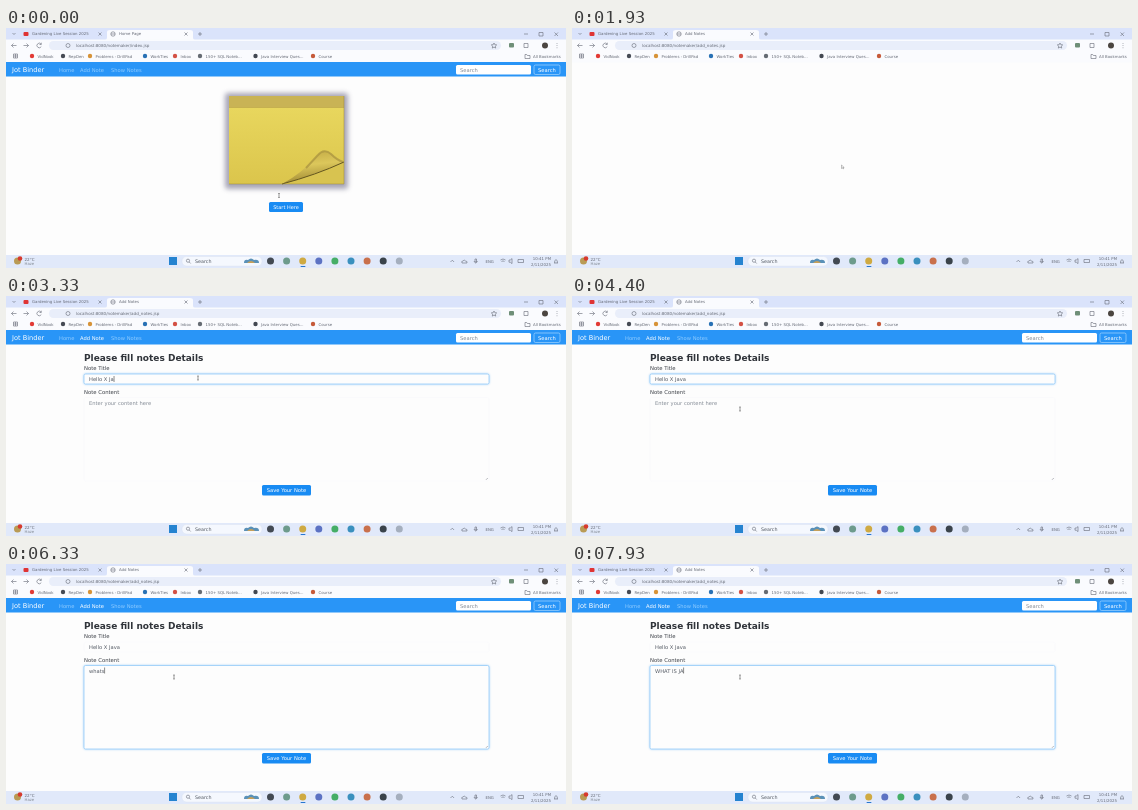
Recreate the animation shown at these times as an HTML page. Size 560x240 px, loop 8 s.

```html
<!DOCTYPE html>
<html lang="en">
<head>
<meta charset="utf-8">
<title>Notes demo</title>
<style>
html, body { margin: 0; width: 100%; height: 100%; overflow: hidden; background: #fdfdfd; }
svg { display: block; width: 560px; height: 240px; }
text { font: 5.2px "DejaVu Sans", sans-serif; white-space: pre; fill: #555b65; }
.small { font-size: 4.1px; fill: #656a76; }
.tiny { font-size: 3.9px; fill: #656a76; }
.brand { font-size: 6.6px; fill: #fff; }
.heading { font-size: 9px; font-weight: bold; fill: #30343a; }
.label { font-size: 5.3px; fill: #3b3f46; }
.hint { fill: #858c96; }
.white { fill: #fff; }
.faded { fill: #8fcbff; }
.line { fill: none; stroke: #666b76; stroke-width: .6; }
.box { fill: #fdfdfd; stroke: #f6f7fa; stroke-width: .5; }
.focus { stroke: #95cbf8; stroke-width: .8; filter: drop-shadow(0 0 .8px #a9d5fa); }
</style>
</head>
<body>
<svg viewBox="0 0 560 240" xmlns="http://www.w3.org/2000/svg">
  <defs>
    <linearGradient id="paper" x1="0" y1="0" x2="0" y2="1">
      <stop offset="0" stop-color="#ead960"/><stop offset="1" stop-color="#dbc54c"/>
    </linearGradient>
    <linearGradient id="flap" x1=".4" y1="0" x2=".6" y2="1">
      <stop offset="0" stop-color="#c5ad47"/><stop offset=".4" stop-color="#dcc75b"/><stop offset="1" stop-color="#98822f"/>
    </linearGradient>
    <filter id="blur" x="-20%" y="-20%" width="140%" height="140%"><feGaussianBlur stdDeviation="2.500"/></filter>
    <filter id="soft" x="-20%" y="-20%" width="140%" height="140%"><feGaussianBlur stdDeviation=".7"/></filter>
  </defs>
  <rect width="560" height="240" fill="#fdfdfd"/>

  <!-- browser frame -->
  <rect width="560" height="14" fill="#dae3fb"/>
  <path d="M99 12q2 0 2-3V4q0-2 3-2h80q3 0 3 2v5q0 3 2 3z" fill="#fafbfe"/>
  <rect y="11.5" width="560" height="23" fill="#fafbfe"/>
  <rect x="43" y="13" width="452" height="9" rx="4.500" fill="#e9eefa"/>
  <path class="line" d="M6.500 5l1.500 1.500 1.500-1.500M92.500 4.500l3 3m0-3l-3 3M178.500 4.500l3 3m0-3l-3 3M192 6h4m-2-2v4M518 6h4M533 4.500h4v3.500h-4zM548.500 4.500l3.500 3.500m0-3.500l-3.500 3.500"/>
  <path class="line" d="M10.500 17.500h-5m2-2l-2 2 2 2M17.500 17.500h5m-2-2l2 2-2 2M35 16a2.300 2.300 0 1 0 .3 2.500M35.300 14.700v1.800h-1.800M551 15v.8m0 1.400v.8m0 1.400v.8"/>
  <path class="line" d="M488 15l.8 1.700 1.900.2-1.400 1.300.4 1.900-1.700-1-1.700 1 .4-1.900-1.400-1.300 1.900-.2z"/>
  <circle class="line" cx="107" cy="6" r="2.200"/><path class="line" d="M105 6h4"/>
  <circle class="line" cx="62" cy="17.500" r="2"/>
  <rect x="503" y="15" width="5" height="4.500" rx="1" fill="#6f8f78"/>
  <path class="line" d="M518 15.500h4v4h-4z"/>
  <circle cx="539" cy="17.500" r="3" fill="#4b4540"/>
  <rect x="17.500" y="4" width="5" height="4" rx="1" fill="#df3434"/>
  <text class="tiny" x="26" y="7.300">Gardening Live Session 2025</text>
  <text class="tiny" id="tab" x="113" y="7.300"></text>
  <text class="small" id="url" x="70" y="19"></text>
  <path class="line" d="M7.500 26h4v4h-4zM9.500 26v4M7.500 28h4M519 26.500h1.700l.7 1h2.600v3h-5z"/>
  <text class="tiny" x="527" y="29.500">All Bookmarks</text>
  <g id="bookmarks"></g>

  <!-- web page -->
  <g id="navbar">
    <rect y="34" width="560" height="14.500" fill="#2995f7"/>
    <text class="brand" x="6" y="43.900">Jot Binder</text>
    <text class="faded" x="53" y="43.600">Home</text>
    <text id="addLink" x="74" y="43.600">Add Note</text>
    <text class="faded" x="105" y="43.600">Show Notes</text>
    <rect x="450" y="37" width="75" height="9.500" rx="1.500" fill="#fff"/>
    <text class="hint" x="454" y="43.600">Search</text>
    <rect x="528" y="37" width="26" height="9.500" rx="1.500" fill="none" stroke="#b9dfff" stroke-width=".6"/>
    <text class="white" x="532" y="43.600">Search</text>
  </g>
  <g id="home">
    <rect x="219" y="65" width="123" height="96" rx="3" fill="#73718c" opacity=".62" filter="url(#blur)"/>
    <rect x="223" y="68" width="115" height="88" fill="url(#paper)"/>
    <rect x="223" y="68" width="115" height="11" fill="#c9b355"/>
    <path d="M223 79.500h115" stroke="#b8a149" stroke-width=".7"/>
    <path d="M276 156L338 134V156z" fill="#d8c350"/>
    <path d="M276 156Q295 146 312 127Q318 120 325 126Q331 132 338 134Q306 148 276 156z" fill="url(#flap)"/>
    <path d="M300 140L312 127Q318 120 325 126Q331 132 337 134" fill="none" stroke="#aa9440" stroke-width="2" opacity=".75" filter="url(#soft)"/>
    <path d="M276 156Q310 147 338 134" fill="none" stroke="#63551f" stroke-width="1"/>
    <path d="M223 156h115V68" fill="none" stroke="#9a8539" stroke-width=".5"/>
    <rect x="263" y="174" width="34" height="10" rx="1.500" fill="#188bf3"/>
    <text class="white" x="280" y="180.900" text-anchor="middle" style="font-size:5px">Start Here</text>
  </g>
  <g id="form">
    <text class="heading" x="78" y="65">Please fill notes Details</text>
    <text class="label" x="78" y="74">Note Title</text>
    <rect id="titleBox" class="box" x="78" y="78" width="405" height="10" rx="1.500"/>
    <text id="title" x="83" y="85"></text>
    <text class="label" x="78" y="98">Note Content</text>
    <rect id="contentBox" class="box" x="78" y="101.500" width="405" height="83.500" rx="1.500"/>
    <text id="content" x="83" y="108.500"></text>
    <path class="line" d="M480 183.800l1.800-1.800" style="stroke-width:.5"/>
    <rect x="256" y="189" width="49" height="10.500" rx="1.500" fill="#188bf3"/>
    <text class="white" x="280.500" y="196.200" text-anchor="middle">Save Your Note</text>
    <rect id="caret" width=".6" height="6" fill="#444"/>
  </g>

  <!-- taskbar -->
  <rect y="227" width="560" height="13" fill="#e1e9fa"/>
  <circle cx="11.500" cy="233" r="3.500" fill="#b99b55"/>
  <circle cx="14" cy="230.500" r="2.300" fill="#d63a2e"/>
  <text class="small" x="18.500" y="232.500">22°C</text>
  <text class="tiny hint" x="18.500" y="237.300">Haze</text>
  <rect x="176" y="228.500" width="80" height="9.500" rx="4.500" fill="#f5f8fe" stroke="#d9e1ef" stroke-width=".4"/>
  <circle class="line" cx="182" cy="232.700" r="1.600"/><path class="line" d="M183.200 234l1.500 1.500"/>
  <text x="189" y="235" style="font-size:4.800px">Search</text>
  <path d="M238 235q0-4 4-3q3-3 6 0q5-1 5 3z" fill="#5a91b8"/>
  <path d="M241 235q4-4 8 0z" fill="#c6a05a"/>
  <g id="apps"></g>
  <rect x="294.500" y="238" width="5" height=".9" rx=".4" fill="#2877cf"/>
  <path class="line" d="M444.500 234l1.800-1.800 1.800 1.800M456 235q-1-2 1-2q1-2 2.500 0q2 0 1.500 2zM469 231h1.500v3H469zM468 233q1.700 4 3.500 0M494.500 232q2.500-2 5 0M495.500 233.500q1.500-1.200 3 0M503 232h1.300l1.700-1.400v5l-1.700-1.400H503zM512 231.500h5.500v3H512zM548 235h4M548.700 235v-2q1.300-3 2.600 0v2"/>
  <text class="tiny" x="479.500" y="234.700">ENG</text>
  <text class="tiny" x="545" y="232.200" text-anchor="end">10:41 PM</text>
  <text class="tiny" x="545" y="237.500" text-anchor="end">2/11/2025</text>

  <g id="pointer">
    <path id="arrow" d="M0 0v3.500l.9-.8.6 1.300.6-.3-.6-1.200h1.200z" fill="#fff" stroke="#666" stroke-width=".4"/>
    <path id="beam" class="line" d="M-.8-2h1.600M0-2v4M-.8 2h1.600" style="stroke:#555;stroke-width:.6"/>
  </g>
</svg>
<script>
const LOOP = 8000;
const $ = id => document.getElementById(id);
const NS = "http://www.w3.org/2000/svg";

function add(parent, tag, attrs, label = "") {
  const node = document.createElementNS(NS, tag);
  for (const key in attrs) node.setAttribute(key, attrs[key]);
  node.textContent = label;
  parent.append(node);
}

[
  [26, "#e23a35", "VidNook"], [57, "#454a54", "RepDen"],
  [84, "#d79338", "Problems - DrillPad"], [139, "#2871b5", "WorkTies"],
  [169, "#d35145", "Inbox"], [194, "#656b73", "150+ SQL Noteb..."],
  [249.5, "#424851", "Java Interview Ques..."], [307, "#c65a39", "Course"]
].forEach(([x, fill, label]) => {
  add($("bookmarks"), "circle", { cx: x, cy: 28, r: 2.2, fill });
  add($("bookmarks"), "text", { x: x + 5.5, y: 29.5, class: "tiny" }, label);
});

["#424952", "#6d9b8c", "#cfaa42", "#5c72c3", "#45ae67", "#3a90be", "#c9704c", "#3a434b", "#a5afbe"]
  .forEach((fill, i) => add($("apps"), "circle", { cx: 264.5 + i * 16.1, cy: 233, r: 3.5, fill }));
add($("apps"), "rect", { x: 163, y: 229, width: 8, height: 8, fill: "#2583d0" });

// time, x, y
const path = [
  [0, 273, 167.5], [500, 273, 167.5], [1000, 279, 179], [1500, 279, 179],
  [1850, 269.5, 137], [2070, 269.5, 137], [2450, 192, 82],
  [3600, 192, 82], [4200, 168, 113], [LOOP, 168, 113]
];

function pointerAt(t) {
  const i = path.findIndex(p => p[0] > t);
  const [t0, x0, y0] = path[i - 1], [t1, x1, y1] = path[i];
  const u = (t - t0) / (t1 - t0), k = u * u * (3 - 2 * u);
  return [x0 + (x1 - x0) * k, y0 + (y1 - y0) * k];
}

const typed = (word, t, start, step) =>
  word.slice(0, Math.max(0, Math.floor((t - start) / step) + 1));

function contentAt(t) {
  if (t < 6500) return typed("whats", t, 5850, 95);
  if (t < 6900) return "whats".slice(0, Math.max(0, 5 - Math.floor((t - 6500) / 70)));
  return typed("WHAT IS JA", t, 6950, 102);
}

const show = (id, on) => $(id).style.display = on ? "" : "none";

function setField(id, value, hint) {
  $(id).textContent = value || hint;
  $(id).setAttribute("class", value ? "" : "hint");
}

function draw(now) {
  const t = now % LOOP;
  const home = t < 1500, form = t >= 2130;
  show("home", home);
  show("navbar", home || form);
  show("form", form);
  $("tab").textContent = home ? "Home Page" : "Add Notes";
  $("url").textContent = "localhost:8080/notemaker/" + (home ? "index.jsp" : "add_notes.jsp");
  $("addLink").setAttribute("class", home ? "faded" : "white");

  const inTitle = t >= 2500 && t < 4730, inContent = t >= 4730;
  const title = typed("Hello X Java", t, 2600, 76), content = contentAt(t);
  setField("title", title, "Enter here");
  setField("content", content, "Enter your content here");
  $("titleBox").classList.toggle("focus", inTitle);
  $("contentBox").classList.toggle("focus", inContent);

  const typing = (t > 2600 && t < 3600) || (t > 5850 && t < 6600) || t > 6950;
  show("caret", (inTitle || inContent) && (typing || (t - 2500) % 1060 < 530));
  if (form) {
    const field = inContent ? "content" : "title";
    const value = inContent ? content : title;
    $("caret").setAttribute("x", 83 + (value ? $(field).getComputedTextLength() : 0));
    $("caret").setAttribute("y", inContent ? 103.5 : 80);
  }

  const [x, y] = pointerAt(t);
  const overText = (form && t > 2300) || t < 600;
  $("pointer").setAttribute("transform", `translate(${x} ${y})`);
  show("arrow", !overText);
  show("beam", overText);
}

function tick() {
  draw(performance.now());
  requestAnimationFrame(tick);
}
tick();
</script>
</body>
</html>
```
